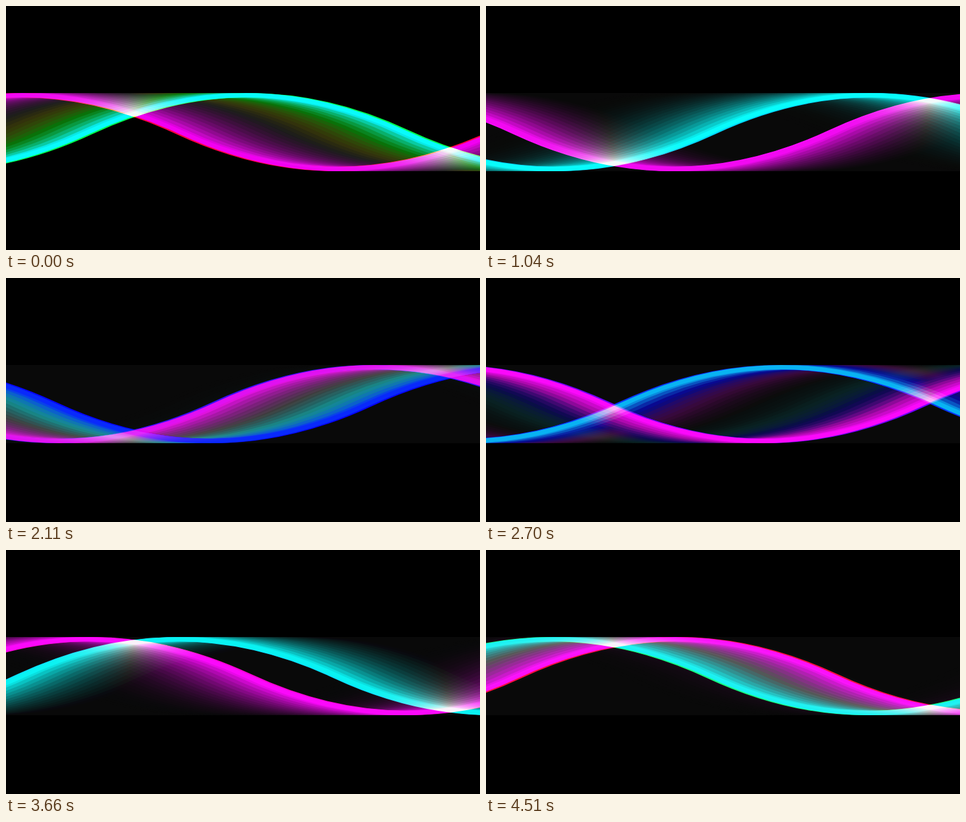
These frames come from a looping animation (750x387 px, 4.59 s). An HTML page without scripts:

```html
<!DOCTYPE html>
<html lang="en">
<head>
<meta charset="utf-8">
<title>Crossing waves</title>
<style>
@property --k { syntax: "<number>"; inherits: true; initial-value: 0; }

html, body { margin: 0; height: 100%; overflow: hidden; background: #000; }
svg {
  display: block; width: 100%; height: 100%;
  isolation: isolate;
  animation: tick 4590ms linear infinite;
}

/* --k counts the ticks; one tick moves a wave by 13.25px */
@keyframes tick {
  0% { --k: 0; }
  .87% { --k: 0; animation-timing-function: steps(9, start); }
  12.53% { --k: 9; animation-timing-function: steps(9, start); }
  24.84% { --k: 18.1; animation-timing-function: steps(10, start); }
  37.25% { --k: 28; animation-timing-function: steps(8, start); }
  49.89% { --k: 35.2; animation-timing-function: steps(8, start); }
  61.66% { --k: 43.2; animation-timing-function: steps(8, start); }
  73.2% { --k: 51.5; animation-timing-function: steps(8, start); }
  85.73% { --k: 59.8; animation-timing-function: steps(8, start); }
  98.26% { --k: 68.2; animation-timing-function: steps(1, start); }
  100% { --k: 69.4; }
}

.band { fill: #090909; opacity: calc(var(--k) / 10); }
.right { --hue: 138; --turn: 3.03; --base: 9; }
.left { --hue: 348; --turn: -2.85; --base: 0; mix-blend-mode: lighten; }
.move { transform: translateX(calc(385px + var(--k) * 13.25px)); }

/* --n is the age of a stroke in ticks, --h its hue in sixths of the wheel */
use {
  --v: calc(1 - var(--n) / 30);
  --f: calc(var(--v) * var(--v) * var(--v) * var(--v) * 255);
  --h: calc(min(345, var(--hue) + var(--turn) * (var(--k) - var(--n))) / 60);
  fill: none;
  stroke-width: 7;
  stroke: rgb(
    calc(var(--base) + var(--f) * clamp(0, 4 * (max(var(--h) - 3, 3 - var(--h)) - 1), 1))
    calc(var(--base) + var(--f) * clamp(0, 4 * (2 - max(var(--h) - 2, 2 - var(--h))), 1))
    calc(var(--base) + var(--f) * clamp(0, 4 * (2 - max(var(--h) - 4, 4 - var(--h))), 1)));
  transform: translateX(calc(var(--n) * -13.25px));
}
.edge { --n: 0; stroke: hsl(calc(var(--h) * 60deg) 100% 50%); }
.core { --n: .4; }
</style>
</head>
<body>
<svg viewBox="0 0 750 387" preserveAspectRatio="none">
  <defs>
    <path id="w" d="M-1750 200q250 117 500 0t500 0t500 0t500 0t500 0"/>
  </defs>
  <rect width="750" height="387"/>
  <rect class="band" y="138" width="750" height="124"/>
  <g class="right"><g class="move">
    <use href="#w" style="--n:25"/><use href="#w" style="--n:24"/>
    <use href="#w" style="--n:23"/><use href="#w" style="--n:22"/>
    <use href="#w" style="--n:21"/><use href="#w" style="--n:20"/>
    <use href="#w" style="--n:19"/><use href="#w" style="--n:18"/>
    <use href="#w" style="--n:17"/><use href="#w" style="--n:16"/>
    <use href="#w" style="--n:15"/><use href="#w" style="--n:14"/>
    <use href="#w" style="--n:13"/><use href="#w" style="--n:12"/>
    <use href="#w" style="--n:11"/><use href="#w" style="--n:10"/>
    <use href="#w" style="--n:9"/><use href="#w" style="--n:8"/>
    <use href="#w" style="--n:7"/><use href="#w" style="--n:6"/>
    <use href="#w" style="--n:5"/><use href="#w" style="--n:4"/>
    <use href="#w" style="--n:3"/><use href="#w" style="--n:2"/>
    <use href="#w" style="--n:1"/>
    <use href="#w" class="edge"/><use href="#w" class="core"/>
  </g></g>
  <g class="left" transform="matrix(-1 0 0 1 406 0)"><g class="move">
    <use href="#w" style="--n:25"/><use href="#w" style="--n:24"/>
    <use href="#w" style="--n:23"/><use href="#w" style="--n:22"/>
    <use href="#w" style="--n:21"/><use href="#w" style="--n:20"/>
    <use href="#w" style="--n:19"/><use href="#w" style="--n:18"/>
    <use href="#w" style="--n:17"/><use href="#w" style="--n:16"/>
    <use href="#w" style="--n:15"/><use href="#w" style="--n:14"/>
    <use href="#w" style="--n:13"/><use href="#w" style="--n:12"/>
    <use href="#w" style="--n:11"/><use href="#w" style="--n:10"/>
    <use href="#w" style="--n:9"/><use href="#w" style="--n:8"/>
    <use href="#w" style="--n:7"/><use href="#w" style="--n:6"/>
    <use href="#w" style="--n:5"/><use href="#w" style="--n:4"/>
    <use href="#w" style="--n:3"/><use href="#w" style="--n:2"/>
    <use href="#w" style="--n:1"/>
    <use href="#w" class="edge"/><use href="#w" class="core"/>
  </g></g>
</svg>
</body>
</html>
```
